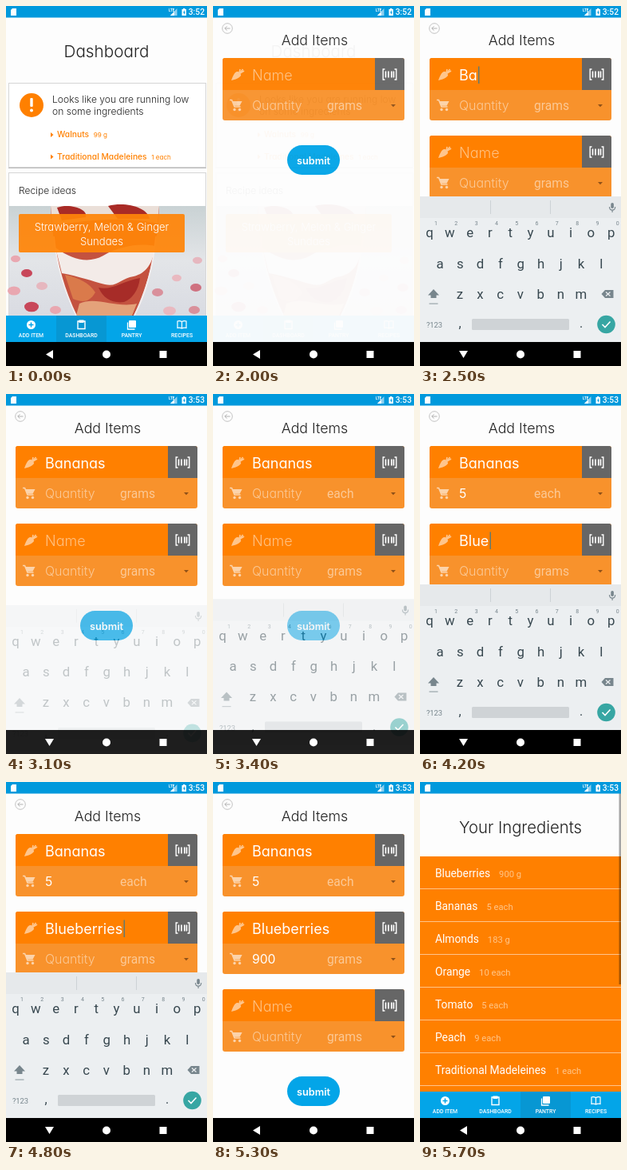
An HTML page that plays this animation: 252 by 450 pixels, repeating every 8.1 s.

```html
<!DOCTYPE html>
<html lang="en">
<head>
<meta charset="utf-8">
<title>Pantry app</title>
<style>
html, body { margin: 0; width: 100%; height: 100%; overflow: hidden; background: #fdfdfd; }
svg { display: block; width: 100vw; height: 100vh; font-family: Roboto, sans-serif; }
.round { font-family: Inter, sans-serif; font-feature-settings: "cv11"; }
</style>
</head>
<body>
<svg id="stage" viewBox="0 0 252 450"></svg>
<script>
const LOOP = 8100;
const ORANGE = '#ff8000', BLUE = '#03a5e8', DARK = '#222', FAINT = 'rgba(255,255,255,.5)';
const stage = document.getElementById('stage');

const clamp = v => Math.max(0, Math.min(1, v));
const esc = s => s.replace(/&/g, '&amp;');
const rect = (x, y, w, h, fill, extra = '') =>
  `<rect x="${x}" y="${y}" width="${w}" height="${h}" fill="${fill}" ${extra}/>`;
const circle = (x, y, r, fill, extra = '') => `<circle cx="${x}" cy="${y}" r="${r}" fill="${fill}" ${extra}/>`;
const shape = (d, fill, extra = '') => `<path d="${d}" fill="${fill}" ${extra}/>`;
const line = (d, color, w = 1) => `<path d="${d}" fill="none" stroke="${color}" stroke-width="${w}"/>`;
const group = (x, y, body, opacity = 1) =>
  `<g transform="translate(${x} ${y})" opacity="${opacity}">${body}</g>`;
const text = (x, y, s, size, fill, weight = 400, extra = '') =>
  `<text x="${x}" y="${y}" font-size="${size}" fill="${fill}" font-weight="${weight}" ${extra}>${esc(s)}</text>`;
const MID = 'text-anchor="middle"';
const round = (x, y, s, size, fill, weight = 300, extra = '') =>
  text(x, y, s, size, fill, weight, 'class="round" ' + extra);

function statusBar(t) {
  return rect(0, 0, 252, 14.5, '#0099dc') +
    shape('M8 3H13V12H6V5Z', '#fff') +
    text(204, 7, 'LTE', 4.5, '#fff', 700) +
    shape('M214.5 3V12H206Z', '#8fd0ef') + shape('M211 7V12H206Z', '#fff') +
    shape('M220.5 4H222V3H224.500V4H226V12H220.5Z', '#fff') +
    shape('M223.700 5L222 8.400H223.200V11L225 7.500H223.700Z', '#0099dc') +
    text(249, 11, t >= 2900 && t < LOOP ? '3:53' : '3:52', 10.3, '#fff', 500, 'text-anchor="end"');
}

function navBar(kb) {
  const moving = kb > 0 && kb < 1;
  return rect(0, 420, 252, 30, '#000', `opacity="${moving ? .88 : 1}"`) +
    shape(kb > 0 ? 'M49 431H60L54.500 440Z' : 'M59 430V441L50 435.500Z', '#fff') +
    circle(126, 435.5, 5, '#fff') + rect(192.5, 431, 9, 9, '#fff');
}

function tabs(active) {
  const icons = [
    circle(0, 0, 5.5, '#fff') + line('M-3 0H3M0 -3V3', BLUE, 1.5),
    line('M-4.500 -4.500H4.500V5H-4.500Z', '#fff', 1.4) + rect(-3, -6, 6, 3.5, '#fff'),
    line('M-5 -3V5.500H4', '#fff', 1.3) + rect(-3.5, -5.5, 9, 9, '#fff', 'rx="1"'),
    line('M0 -4C-2 -5 -4 -5 -5.500 -4.500V4C-4 3.500 -2 3.500 0 4.500C2 3.500 4 3.500 5.500 4V-4.500C4 -5 2 -5 0 -4V4.500', '#fff', 1.2)
  ];
  const labels = ['ADD ITEM', 'DASHBOARD', 'PANTRY', 'RECIPES'];
  return rect(0, 387, 252, 33, BLUE) + rect(active * 63, 387, 63, 33, '#0797d3') +
    labels.map((s, i) => group(31.5 + i * 63, 398.5, icons[i] +
      text(0, 15.7, s, 6.9, '#fff', 500, MID))).join('');
}

function photo() {
  const dots = [[12, 316, 6, '#e9a7b0'], [26, 334, 7, '#c8475a'], [10, 356, 8, '#e9a7b0'], [45, 350, 7, '#e6b7bf'],
    [32, 376, 9, '#c8475a'], [62, 380, 7, '#e9a7b0'], [190, 358, 7, '#d9909b'], [214, 340, 6, '#e9b9c0'],
    [238, 352, 7, '#cf7180'], [205, 381, 8, '#e9b9c0'], [240, 318, 6, '#e6b7bf'], [236, 380, 7, '#d9909b']];
  return rect(4, 250, 246, 137, 'url(#cloth)') +
    dots.map(([x, y, r, c]) => `<ellipse cx="${x}" cy="${y}" rx="${r}" ry="${r * .7}" fill="${c}"/>`).join('') +
    shape('M56 250H192C190 300 180 345 160 387H88C68 345 58 300 56 250Z', '#c4523f') +
    shape('M56 250H192L190 272C150 262 100 268 58 274Z', '#eadfd8') +
    shape('M64 252C80 246 104 254 100 264L70 268ZM128 250C150 244 178 252 180 266L140 266Z', '#a92b26') +
    shape('M62 302C84 318 104 322 122 312C142 300 168 296 187 300C184 322 176 334 160 338C144 340 140 352 124 348C108 344 92 338 70 334Z', '#f3ebe8') +
    shape('M74 336C92 340 104 346 112 358C104 372 94 370 84 366Z', '#da7a4b') +
    shape('M116 352C132 356 146 344 168 340C166 356 158 366 148 370C134 372 122 366 116 352Z', '#a72c28') +
    shape('M92 372C112 362 138 378 164 372L158 387H88Z', '#e4a27a') +
    line('M60 288C64 330 76 362 88 387M188 288C184 330 174 362 161 387', '#f4eeee', 1.8);
}

function dashboard() {
  const item = (y, name, amount) => shape(`M56 ${y - 6}L59.500 ${y - 3}L56 ${y}Z`, ORANGE) +
    round(64, y, `${name}`, 10.3, ORANGE, 500).replace('</text>',
      `<tspan dx="5.5" font-size="8.1" font-weight="400">${amount}</tspan></text>`);
  const edge = 'stroke="#d6d6d6"';
  return rect(0, 14, 252, 406, '#fdfdfd') +
    round(126, 63.5, 'Dashboard', 20.7, DARK, 300, MID) +
    rect(3.5, 96.5, 247, 105, '#fff', edge) + rect(3.5, 208.5, 247, 190, '#fff', edge) +
    line('M3 202.500H251', '#bbb') +
    circle(32, 124, 15, ORANGE) + rect(30.3, 115, 3.4, 11, '#fff', 'rx="1"') + circle(32, 130.5, 2, '#fff') +
    round(58, 121, 'Looks like you are running low', 12.1, DARK) +
    round(58, 136, 'on some ingredients', 12.1, DARK) +
    item(164, 'Walnuts', '99 g') + item(191.5, 'Traditional Madeleines', '1 each') +
    round(16, 235, 'Recipe ideas', 12, DARK) +
    photo() + rect(16, 260, 208, 48, '#ff8508', 'rx="2" opacity=".93"') +
    round(120, 281, 'Strawberry, Melon & Ginger', 13.1, '#fff', 300, MID) +
    round(120, 298.5, 'Sundaes', 13.1, '#fff', 300, MID) + tabs(1);
}

function field(x, y, value, hint, size, hintSize, cursor) {
  const mark = cursor ? '<tspan fill="#557a7a" font-weight="400" dx="-1">|</tspan>' : '';
  return round(x, y, value || hint, value ? size : hintSize, value ? '#fff' : FAINT, value ? 400 : 300)
    .replace('</text>', mark + '</text>');
}

function card(i, c) {
  const carrot = shape('M-8 7C-6 1 -4 -3 -1 -4C2 -4 4 -2 4 1C2 4 -3 6 -8 7Z', '#fff') +
    line('M2 -2L3 -7M3 -2L8 -5M2 -1L6.500 -7', '#fff', 1.7);
  const cart = line('M-8 -6.500H-5.500L-2 2H5.500', '#fff', 1.6) + shape('M-5 -5H7.500L4.500 0.800H-2.500Z', '#fff') +
    circle(-2, 5.5, 1.7, '#fff') + circle(4.5, 5.5, 1.7, '#fff');
  const scan = line('M-6 -6.500H-8.300V6.500H-6M6 -6.500H8.300V6.500H6', '#fff', 1.4) +
    line('M-5 -4V4M-1.500 -4V4M2.300 -4V4M5 -4V4', '#fff', 1.7);
  return group(0, 97 * i,
    rect(12, 65, 228, 78, '#f8922c', 'rx="3"') +
    shape('M15 65H203V105H12V68Q12 65 15 65Z', ORANGE) +
    shape('M203 65H237Q240 65 240 68V105H203Z', '#666') +
    group(31, 86, carrot, .55) + group(29, 124, cart, .6) + group(221.5, 85.5, scan) +
    field(49, 93, c.name, 'Name', 18, 18, c.nameCursor) +
    field(49, 130, c.qty, 'Quantity', 15.7, 15.9, c.qtyCursor) +
    text(143, 130, c.unit, 15.6, FAINT) +
    shape('M223 123H229L226 126.300Z', '#8f5118'));
}

function addItems(t) {
  const typed = (s, start, span) => s.slice(0, Math.max(0, Math.floor((t - start) * s.length / span)));
  const within = (a, b) => t >= a && t <= b;
  const cards = [
    { name: typed('Bananas', 2300, 700), qty: t >= 3500 ? '5' : '', unit: t >= 3300 ? 'each' : 'grams',
      nameCursor: within(2400, 3000), qtyCursor: within(3500, 3600) },
    { name: typed('Blueberries', 3800, 1000), qty: typed('900', 4800, 300), unit: 'grams',
      nameCursor: within(3900, 4800), qtyCursor: within(4900, 5100) },
    { name: '', qty: '', unit: 'grams' }
  ].slice(0, t < 2400 ? 1 : t < 3900 ? 2 : 3);
  const y = 97 * (cards.length - 1);
  return rect(0, 14, 252, 406, '#fdfdfd') +
    circle(18, 28, 6.3, 'none', 'stroke="#bbb" stroke-width=".9"') +
    line('M21.500 28H14.800M17.500 25.300L14.800 28L17.500 30.700', '#aaa', .9) +
    round(127.5, 48.5, 'Add Items', 17.8, DARK, 300, MID) +
    cards.map((c, i) => card(i, c)).join('') +
    rect(93, 174 + y, 66, 37, BLUE, 'rx="18.5"') +
    round(126, 197.5 + y, 'submit', 12.8, '#fff', 600, MID);
}

function keyboard(caps, p) {
  const ink = '#37474f', teal = '#37a6a3', soft = '#78868d';
  const rows = [['qwertyuiop', 12, 289], ['asdfghjkl', 25, 327.5], ['zxcvbnm', 50, 365.5]];
  const keys = rows.map(([s, x, y]) => [...s].map((k, i) =>
    text(x + 25.3 * i, y, caps ? k.toUpperCase() : k, 16.8, ink, 400, MID)).join('')).join('');
  const digits = [...'1234567890'].map((d, i) => text(20 + 25.3 * i, 274, d, 7, soft, 400, MID)).join('');
  const body = rect(0, 238, 252, 182, '#eceff1') + rect(0, 238, 252, 27, '#e6e9eb') +
    line('M88.500 243V260M163.500 243V260', '#cdd2d5') +
    rect(239.3, 246, 3.6, 7, soft, 'rx="1.8"') + line('M237.500 251C237.500 256.500 244.700 256.500 244.700 251M241.100 255V258', soft, 1.1) +
    keys + digits +
    shape('M17 354L24 361.500H20.500V365H13.500V361.500H10Z', caps ? teal : soft) +
    rect(11.5, 371.5, 11, 1.2, caps ? soft : '#9aa5aa') +
    shape('M232 355H242.500V365H232L227.500 360Z', soft) + line('M233 357.500L238.500 362.500M238.500 357.500L233 362.500', '#eceff1', 1.2) +
    text(18, 402, '?123', 9.4, soft, 400, MID) + text(50, 402, ',', 16, ink, 400, MID) +
    rect(65, 391, 122, 14, '#cfd3d6', 'rx="1.5"') + text(202, 402, '.', 16, ink, 400, MID) +
    circle(233.5, 398, 11.3, teal) + line('M228.500 398L232 401.500L238.500 394.500', '#fff', 1.6);
  return group(0, 37 * (1 - p), body, p);
}

function pantry() {
  const items = [['Blueberries', '900 g'], ['Bananas', '5 each'], ['Almonds', '183 g'], ['Orange', '10 each'],
    ['Tomato', '5 each'], ['Peach', '9 each'], ['Traditional Madeleines', '1 each']];
  return rect(0, 14, 252, 79, '#fdfdfd') + rect(0, 93, 252, 294, ORANGE) +
    round(126, 63.5, 'Your Ingredients', 20.3, DARK, 300, MID) +
    items.map(([name, qty], i) => text(19, 118.7 + 41 * i, name, 13.8, '#fff').replace('</text>',
      `<tspan dx="11" font-size="11.2" fill="#ffc588">${qty}</tspan></text>`) +
      line(`M0 ${133.5 + 41 * i}H252`, '#ffc48a')).join('') +
    rect(249.5, 14, 2.5, 239, '#000', 'opacity=".35"') + tabs(2);
}

// Keyboard presence, 0 (hidden) to 1 (fully open)
function keyboardAt(t) {
  const up = start => clamp((t - start) / 200), down = start => clamp((t - start) / 100);
  return t < 3200 ? up(2150) - down(3030) : up(3300) - down(5130);
}

function render(t) {
  const adding = t >= 2000 && t < 5700;
  const kb = adding ? keyboardAt(t) : 0;
  const caps = t < 2400 || (t >= 3700 && t < 3900);
  let out = '<defs><linearGradient id="cloth" x2="0" y2="1"><stop stop-color="#c9d2d4"/>' +
    '<stop offset=".5" stop-color="#e3e5e8"/><stop offset="1" stop-color="#d9dbe2"/></linearGradient></defs>';
  if (t < 2100) out += dashboard();
  if (adding) out += group(0, 0, addItems(t), t < 2100 ? .96 : 1);
  if (kb > 0) out += keyboard(caps, kb);
  if (t >= 5500) out += group(0, 0, pantry(), clamp((t - 5400) / 250));
  return out + statusBar(t) + navBar(kb);
}

let shown = -1;
function tick() {
  const t = Math.floor(performance.now() % LOOP / 100) * 100;
  if (t !== shown) stage.innerHTML = render(shown = t);
  requestAnimationFrame(tick);
}
tick();
</script>
</body>
</html>
```
